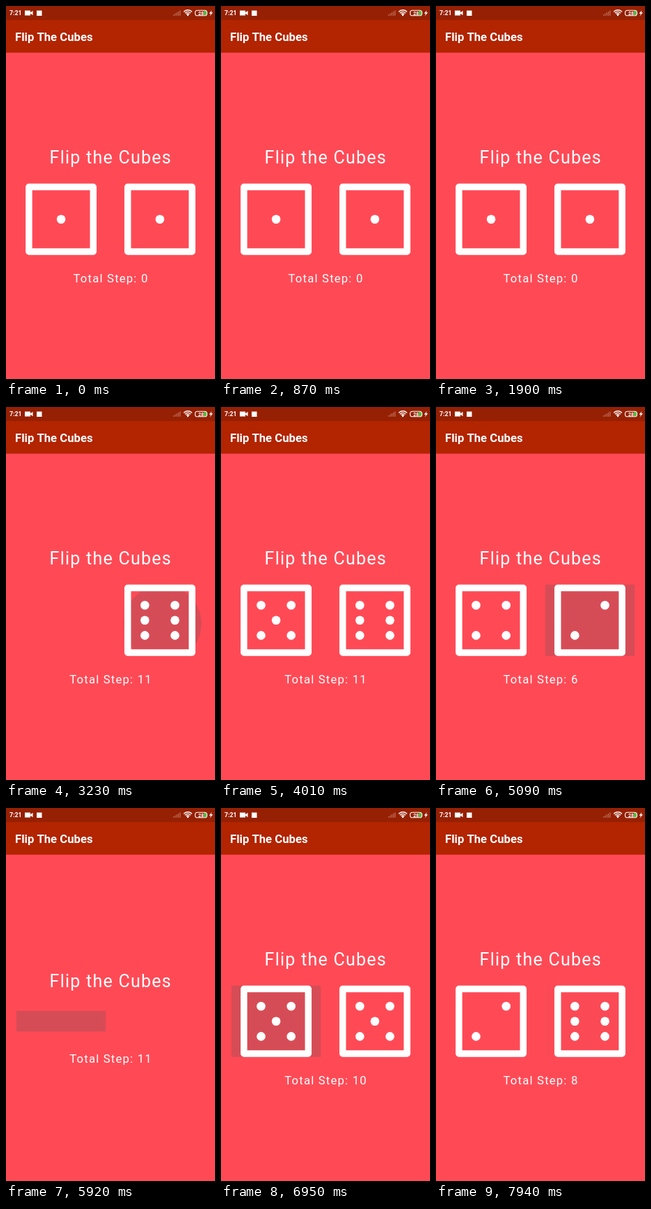
An HTML page with a canvas that plays this animation: 300x533 px, repeating every 7.99 s.

```html
<!DOCTYPE html>
<html lang="en">
<head>
<meta charset="utf-8">
<title>Flip The Cubes</title>
<style>
  html, body { margin: 0; width: 100%; height: 100%; overflow: hidden; background: #ff4a56; }
  canvas { display: block; width: 300px; height: 533px; }
</style>
</head>
<body>
<canvas></canvas>
<script>
const LOOP = 7990;
const CENTER_Y = 304.8;
const DIE_X = [79.1, 220.9];
const LOAD_TIME = 60; // a changed die is blank while its picture loads

// roll time, press lead, pressed die, resulting faces
const TAPS = [
  { at: 2240, lead: 50, side: 1, faces: [1, 6] },
  { at: 3230, lead: 0, side: 1, faces: [5, 6] },
  { at: 4170, lead: 90, side: 1, faces: [3, 4] },
  { at: 5030, lead: 90, side: 1, faces: [4, 2] },
  { at: 5900, lead: 90, side: 0, faces: [6, 5] },
  { at: 6780, lead: 90, side: 0, faces: [5, 5] },
  { at: 7560, lead: 90, side: 1, faces: [2, 6] }
];

const canvas = document.querySelector('canvas');
const ctx = canvas.getContext('2d');
const scale = window.devicePixelRatio || 1;
canvas.width = 300 * scale;
canvas.height = 533 * scale;

function rect(x, y, w, h, color) {
  ctx.fillStyle = color;
  ctx.fillRect(x, y, w, h);
}

function disc(x, y, r, color) {
  ctx.fillStyle = color;
  ctx.beginPath();
  ctx.arc(x, y, r, 0, Math.PI * 2);
  ctx.fill();
}

function polygon(points, color) {
  ctx.fillStyle = color;
  ctx.beginPath();
  points.forEach(([x, y]) => ctx.lineTo(x, y));
  ctx.fill();
}

function text(str, x, y, size, { weight = 400, align = 'left', spacing = 0 } = {}) {
  ctx.font = `${weight} ${size}px Roboto, sans-serif`;
  ctx.textAlign = align;
  ctx.letterSpacing = spacing + 'px';
  ctx.fillStyle = '#fff';
  ctx.fillText(str, x, y);
}

function drawStatusBar() {
  rect(0, 0, 300, 20, '#962003');
  text('7:21', 5, 13.3, 8.8, { weight: 700 });
  rect(27, 6.5, 8, 7, '#fff');
  polygon([[34, 10], [38.5, 6.8], [38.5, 13.2]], '#fff');
  rect(44, 6.5, 7.5, 7.5, '#fff');

  for (let i = 0; i < 5; i++) rect(240 + i * 2.3, 12 - i * 1.4, 1.2, 1.8 + i * 1.4, '#c0705c');

  ctx.strokeStyle = '#fff';
  ctx.lineWidth = 1.4;
  for (const r of [3, 5.6, 8.2]) {
    ctx.beginPath();
    ctx.arc(261, 14, r, -Math.PI * 0.76, -Math.PI * 0.24);
    ctx.stroke();
  }
  disc(261, 13, 1.2, '#fff');

  rect(284, 7, 4, 6, '#4fbd3c');
  ctx.lineWidth = 1.1;
  ctx.beginPath();
  ctx.roundRect(271.5, 6.2, 17, 7.6, 3.4);
  ctx.stroke();
  text('28', 280, 12.7, 7, { weight: 700, align: 'center' });
  polygon([[295.5, 6], [291.5, 10.7], [294, 10.7], [292.5, 14.5], [297, 9.3], [294.5, 9.3]], '#fff');
}

function drawDie(cx, face) {
  ctx.strokeStyle = '#fff';
  ctx.lineWidth = 9.5;
  ctx.lineJoin = 'round';
  ctx.strokeRect(cx - 46.2, CENTER_Y - 46.2, 92.4, 92.4);
  const pip = (col, row) => disc(cx + col * 21.6, CENTER_Y + row * 21.6, 6.3, '#fff');
  const pair = (col, row) => { pip(col, row); pip(-col, -row); };
  if (face % 2) pip(0, 0);
  if (face > 1) pair(1, -1);
  if (face > 3) pair(1, 1);
  if (face === 6) pair(1, 0);
}

function drawRipple(time, halfHeight) {
  for (const { at, lead, side } of TAPS) {
    const age = time - at;
    if (age < -lead || age > 400) continue;
    const fade = Math.min(1, (400 - age) / 200);
    ctx.save();
    ctx.beginPath();
    ctx.rect(DIE_X[side] - 64.1, CENTER_Y - halfHeight, 128.2, halfHeight * 2);
    ctx.clip();
    const [dx, dy] = side ? [4, 5] : [0, 0];
    disc(DIE_X[side] + dx, CENTER_Y + dy, 55 + age * 0.6, `rgba(130, 80, 86, ${0.33 * fade})`);
    ctx.restore();
  }
}

function draw(time) {
  let previous = [1, 1], faces = [1, 1], rolledAt = -Infinity;
  for (const tap of TAPS) {
    if (time < tap.at) break;
    [previous, faces, rolledAt] = [faces, tap.faces, tap.at];
  }
  const loading = faces.map((face, i) => face !== previous[i] && time - rolledAt < LOAD_TIME);
  const collapsed = loading[0] && loading[1];
  const shift = collapsed ? 31 : 0;
  const total = rolledAt < 0 ? 0 : faces[0] + faces[1];

  ctx.setTransform(scale, 0, 0, scale, 0, 0);
  rect(0, 0, 300, 533, '#ff4a56');
  rect(0, 20, 300, 46.67, '#b32400');
  drawStatusBar();
  text('Flip The Cubes', 13, 50, 16.67, { weight: 700 });

  text('Flip the Cubes', 150.3, 225 + shift, 25, { align: 'center', spacing: 1.25 });
  drawRipple(time, collapsed ? 14.8 : 51);
  DIE_X.forEach((x, i) => { if (!loading[i]) drawDie(x, faces[i]); });
  text(`Total Step: ${total}`, 150.5, 395 - shift, 16.67, { align: 'center', spacing: 1.2 });
}

const start = performance.now();
function tick() {
  draw((performance.now() - start) % LOOP);
  requestAnimationFrame(tick);
}
tick();
</script>
</body>
</html>
```
